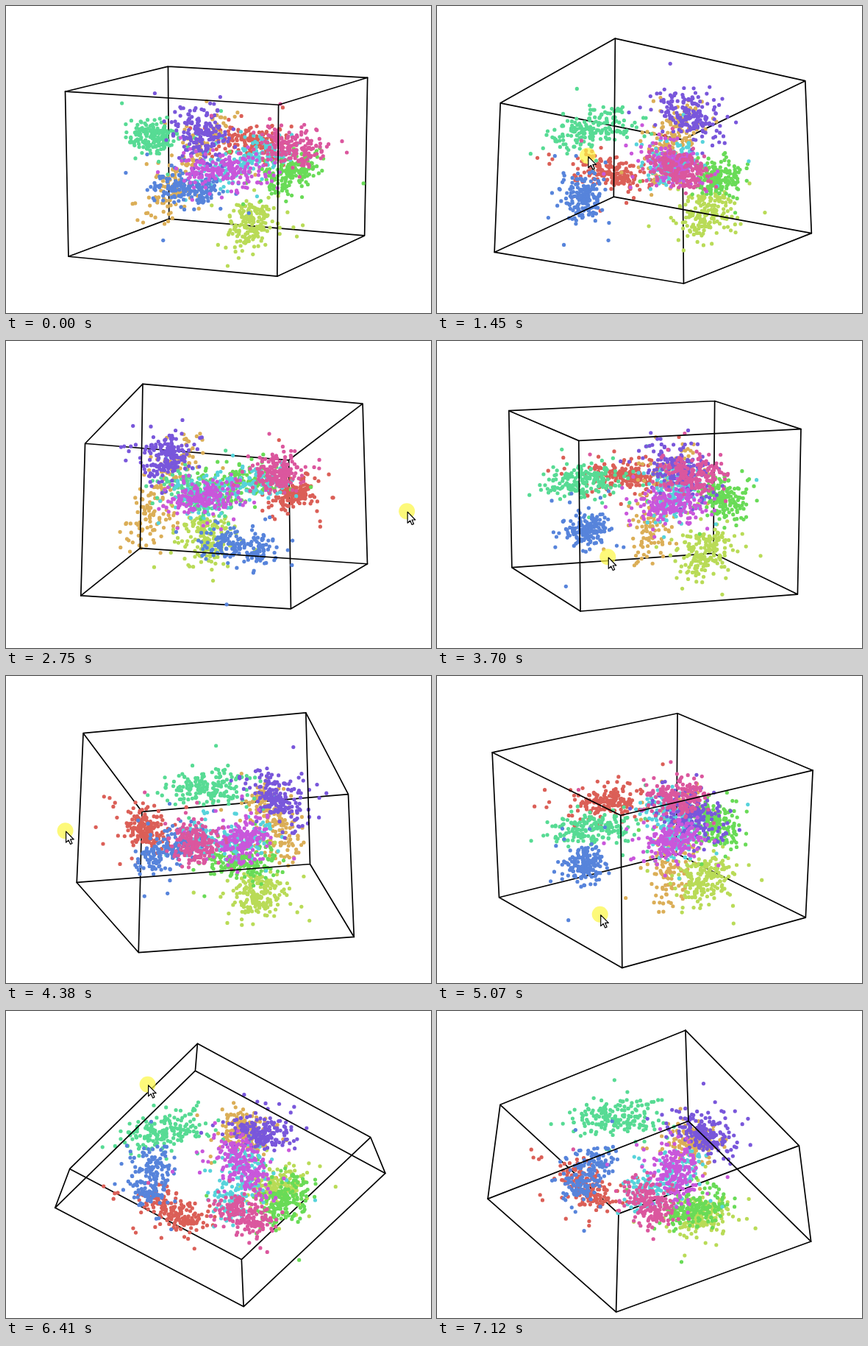
Write an HTML page with a canvas that moves like this. It is 578 by 417 pixels and loops after 7.65 s.

```html
<!DOCTYPE html>
<html lang="en">
<head>
<meta charset="utf-8">
<title>Rotating point cloud</title>
<style>
html, body { margin: 0; width: 100%; height: 100%; overflow: hidden; background: #fff; }
canvas { display: block; }
</style>
</head>
<body>
<canvas id="stage" width="578" height="417"></canvas>
<script>
const ctx = document.getElementById('stage').getContext('2d');
const LOOP = 7650, STEP = 75;
const CENTER = [290.8, 217.3], HALF = 153, DISTANCE = 3200, SQUASH = 0.734;

// Each class is scattered along a line between two points of the cube
const CLASSES = [
  [[-38, 28, -100], [30, 25, -108]],
  [[-50, -70, 108], [20, 105, 50]],
  [[55, -125, 38], [70, -62, 42]],
  [[95, -15, 40], [115, 10, -30]],
  [[-122, 35, -25], [-70, 65, 38]],
  [[5, -5, 65], [65, 30, -70]],
  [[-98, -50, -20], [-50, -75, -92]],
  [[-15, 105, 62], [38, 38, 95]],
  [[-22, 0, 60], [60, -3, 0]],
  [[55, 42, -52], [112, 22, -56]]
];
const PER_CLASS = 180;

// Turning points of the view: time, yaw, pitch
const VIEWS = [
  [150, -25, 12.6],
  [840, -5, 2],
  [1450, 32.6, -24.3],
  [1950, 48, -54],
  [2750, -72.7, -19.3],
  [3700, 20.1, 13.3],
  [4380, 76.7, -28.1],
  [5000, 35, 28],
  [5870, -3.9, -79],
  [6450, 40, -76],
  [7120, 57.6, -55]
];

let seed = 7;
function random() {
  seed = (seed * 16807) % 2147483647;
  return seed / 2147483647;
}

function gauss() {
  return Math.sqrt(-2 * Math.log(random())) * Math.cos(2 * Math.PI * random());
}

function scatter([from, to], index) {
  const color = `hsl(${3.6 + 36 * index}, 65%, 60%)`;
  return Array.from({ length: PER_CLASS }, () => {
    const along = random(), spread = random() < 0.14 ? 32 : 15;
    const pos = from.map((v, axis) => v + (to[axis] - v) * along + spread * gauss());
    return { color, pos };
  });
}
const points = CLASSES.flatMap(scatter);

// Corner index bits give the signs of x, y and z
const corners = Array.from({ length: 8 }, (_, i) =>
  [0, 1, 2].map(axis => (i >> axis & 1 ? HALF : -HALF)));
const edges = [];
for (let i = 0; i < 8; i++)
  for (const bit of [1, 2, 4]) if (!(i & bit)) edges.push([i, i | bit]);

// Flat at the ends and wherever the motion reverses
function slope(i, c) {
  const a = VIEWS[i - 1], b = VIEWS[i], d = VIEWS[i + 1];
  if (!a || !d || (b[c] - a[c]) * (d[c] - b[c]) <= 0) return 0;
  return (d[c] - a[c]) / (d[0] - a[0]);
}

function viewAt(time) {
  const next = VIEWS.findIndex(v => v[0] > time);
  if (next === 0) return VIEWS[0].slice(1);
  if (next < 0) return VIEWS[VIEWS.length - 1].slice(1);
  const a = VIEWS[next - 1], b = VIEWS[next], span = b[0] - a[0];
  const u = Math.floor((time - a[0]) / STEP) * STEP / span;
  return [1, 2].map(c => {
    const m = slope(next - 1, c) * span, n = slope(next, c) * span, d = b[c] - a[c];
    return a[c] + u * (m + u * (3 * d - 2 * m - n + u * (m + n - 2 * d)));
  });
}

// The view follows the pointer with a short lag
function pointerAt(time) {
  const [yaw, pitch] = viewAt(time + STEP);
  const entry = Math.max(0, 1 - (time - 150) / 500);
  return [319 - 3.16 * yaw, 267 + 2.2 * pitch + 105 * entry * entry];
}

function projector([yaw, pitch]) {
  const rad = Math.PI / 180;
  const cy = Math.cos(yaw * rad), sy = Math.sin(yaw * rad);
  const cp = Math.cos(pitch * rad), sp = Math.sin(pitch * rad);
  return ([x, y, z]) => {
    const side = x * cy + z * sy, near = z * cy - x * sy;
    const depth = y * sp + near * cp;
    const scale = 1 / (1 - depth / DISTANCE);
    return [CENTER[0] + side * scale,
            CENTER[1] - (y * cp - near * sp) * scale * SQUASH, depth];
  };
}

function drawEdges(list, at) {
  ctx.beginPath();
  for (const [a, b] of list) {
    ctx.moveTo(at[a][0], at[a][1]);
    ctx.lineTo(at[b][0], at[b][1]);
  }
  ctx.stroke();
}

function disc(x, y, r, color) {
  ctx.fillStyle = color;
  ctx.beginPath();
  ctx.arc(x, y, r, 0, 2 * Math.PI);
  ctx.fill();
}

const arrow = new Path2D('M0 0V15L3.5 11.8L6 17.3L8.4 16.2L6 10.8H10.6Z');

function drawPointer([x, y]) {
  disc(x, y, 11, 'rgba(252,246,70,.72)');
  ctx.save();
  ctx.translate(x + 1, y + 1);
  ctx.lineWidth = 1.2;
  ctx.fillStyle = '#fff';
  ctx.fill(arrow);
  ctx.stroke(arrow);
  ctx.restore();
}

function draw(time) {
  const project = projector(viewAt(time));
  const at = corners.map(project);
  const nearest = at.reduce((best, p, i) => (p[2] > at[best][2] ? i : best), 0);
  const isFront = edge => edge.includes(nearest);

  ctx.fillStyle = '#fff';
  ctx.fillRect(0, 0, 578, 417);
  ctx.strokeStyle = '#000';
  ctx.lineWidth = 1.7;
  ctx.lineCap = ctx.lineJoin = 'round';
  drawEdges(edges.filter(e => !isFront(e)), at);
  for (const { color, pos } of points) {
    const [x, y] = project(pos);
    disc(x, y, 2.6, color);
  }
  drawEdges(edges.filter(isFront), at);
  if (time >= 225 && time < 6950) drawPointer(pointerAt(time));
}

const start = performance.now();
function tick() {
  draw((performance.now() - start) % LOOP);
  requestAnimationFrame(tick);
}
tick();
</script>
</body>
</html>
```
